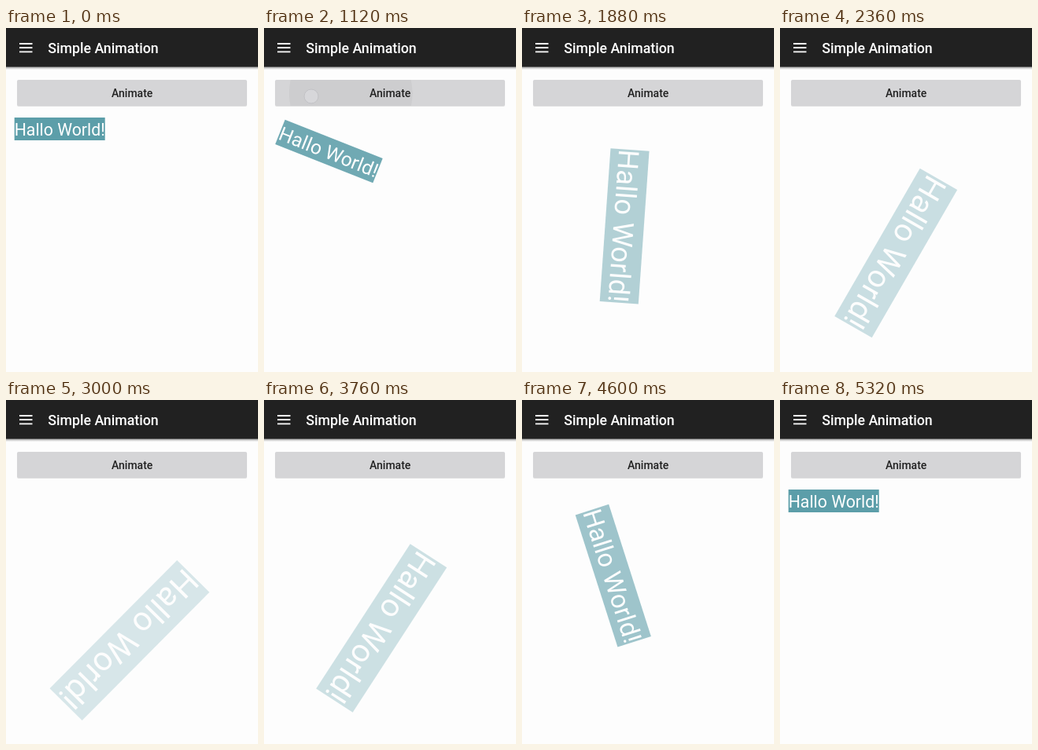
Animation, 320 px wide and 438 px high, one loop 6.52 s. Source, as an HTML page:

```html
<!DOCTYPE html>
<html lang="en">
<head>
<meta charset="utf-8">
<title>Simple Animation</title>
<style>
  html, body { margin: 0; width: 100%; height: 100%; overflow: hidden; background: #fdfdfd; }
  svg { display: block; width: 320px; height: 438px; font-family: Roboto, sans-serif; }
  .medium { font-weight: 500; }
</style>
</head>
<body>
<svg viewBox="0 0 320 438">
  <defs>
    <linearGradient id="shade" x2="0" y2="1">
      <stop offset="0" stop-color="#000" stop-opacity=".4"/>
      <stop offset="1" stop-color="#000" stop-opacity="0"/>
    </linearGradient>
    <clipPath id="buttonShape"><rect x="14" y="66" width="292" height="33" rx="2"/></clipPath>
  </defs>
  <rect width="320" height="438" fill="#fdfdfd"/>

  <rect y="49" width="320" height="4" fill="url(#shade)"/>
  <rect width="320" height="49.5" fill="#212121"/>
  <path d="M17 20h16.5M17 25.2h16.5M17 30.4h16.5" stroke="#fff" stroke-width="1.8"/>
  <text class="medium" x="53.2" y="32" font-size="17.75" fill="#fff">Simple Animation</text>

  <rect x="14" y="67" width="292" height="33" rx="2" fill="#000" opacity=".12"/>
  <rect x="14" y="66" width="292" height="33" rx="2" fill="#d5d5d7"/>
  <g clip-path="url(#buttonShape)"><circle id="ripple" cy="83"/></g>
  <circle id="touch" cx="60" cy="87" r="9" fill="#dcdce0" stroke="#bcbcc0"/>
  <text class="medium" x="160.2" y="87.8" font-size="14" text-anchor="middle" fill="#212121">Animate</text>

  <g id="label">
    <rect x="-57.5" y="-14.5" width="115" height="29" fill="#5c9ea9"/>
    <text x="-57.5" y="8.2" font-size="21.25" fill="#fff">Hallo World!</text>
  </g>
</svg>
<script>
const LOOP = 6520;
const [label, ripple, touch] = ['label', 'ripple', 'touch'].map(id => document.getElementById(id));

const ramp = (t, from, to) => Math.min(1, Math.max(0, (t - from) / (to - from)));

// Decelerates on the way out, accelerates on the way back.
function progress(t) {
  if (t < 3100) {
    const u = 0.25 * ramp(t, 960, 1440) + 0.75 * ramp(t, 1440, 3100);
    return 1 - (1 - u) ** 2;
  }
  return 1 - ramp(t, 3105, 5300) ** 2;
}

function draw(t) {
  const p = progress(t);
  label.setAttribute('transform',
    `translate(${68.2 + 88.9 * p} ${128.5 + 177.8 * p}) rotate(${135 * p}) scale(${1 + p})`);
  label.setAttribute('opacity', 1 - 0.77 * p);

  const spread = ramp(t, 880, 1360);
  ripple.setAttribute('cx', 60 + 100 * spread);
  ripple.setAttribute('r', 156 * spread);
  ripple.setAttribute('opacity', 0.04 * (1 - ramp(t, 1120, 1400)));
  touch.setAttribute('opacity', 0.7 * ramp(t, 780, 840) * (1 - ramp(t, 1120, 1240)));
}

function tick() {
  draw(performance.now() % LOOP);
  requestAnimationFrame(tick);
}
tick();
</script>
</body>
</html>
```
